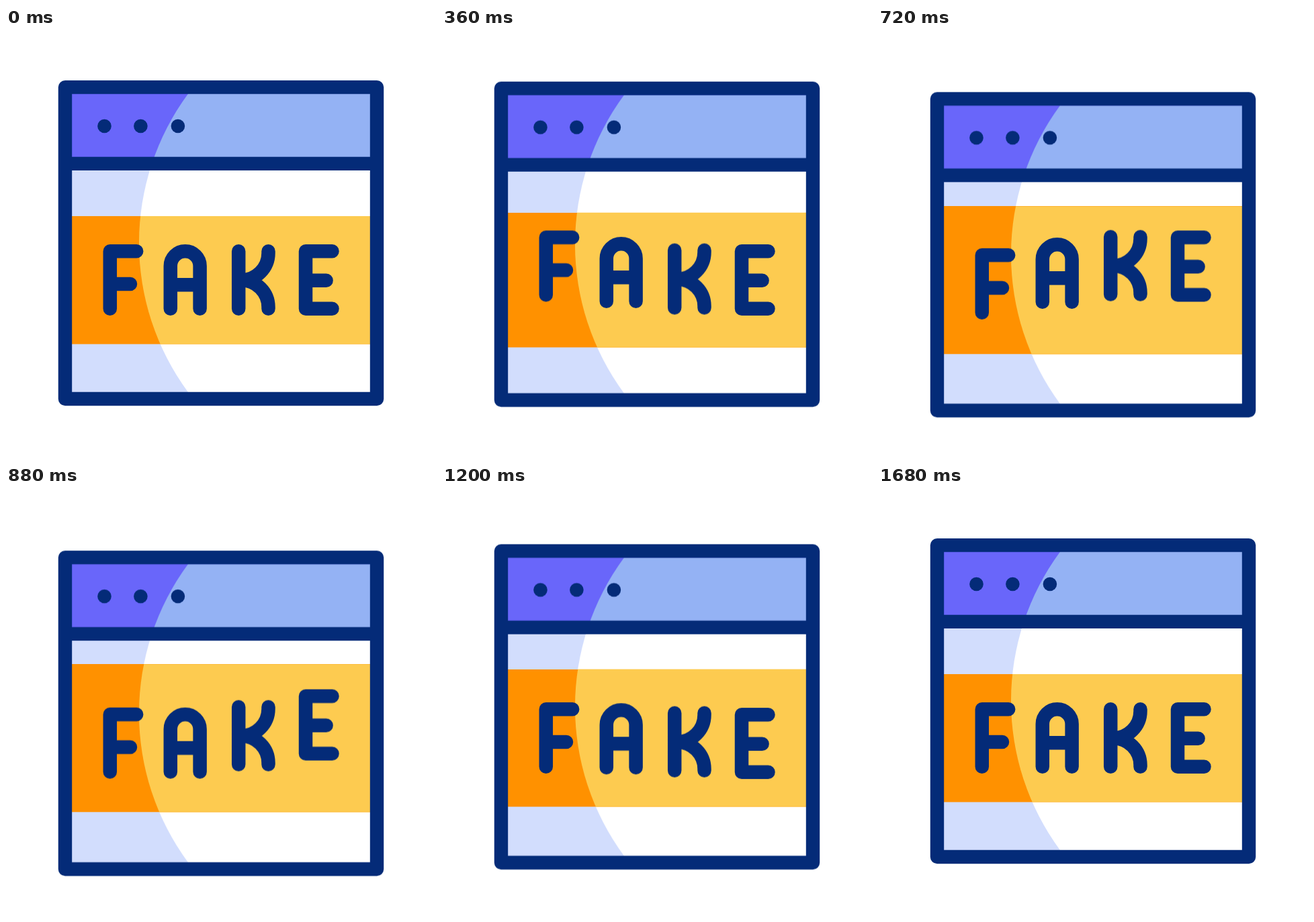
An HTML page for the animation above (1720 ms loop, 640 by 640 pixels).

```html
<!DOCTYPE html>
<html lang="en">
<head>
<meta charset="utf-8">
<title>Fake page</title>
<style>
  html, body { margin: 0; width: 100%; height: 100%; overflow: hidden; background: #fff; }
  svg { display: block; width: 100%; height: 100%; }

  .sink, .band, .letters path {
    animation: 1720ms cubic-bezier(.5, 0, .5, 1) infinite;
  }
  .sink { --dy: 18.3px; animation-name: sink; }
  .undo { --dy: -18.3px; }
  .band { animation-name: grow; transform-origin: 320px 375.25px; }
  .letters path { animation-name: hop; }
  .letters path:nth-child(2) { animation-delay: 120ms; }
  .letters path:nth-child(3) { animation-delay: 240ms; }
  .letters path:nth-child(4) { animation-delay: 360ms; }

  @keyframes sink {
    0%, 12.5% { transform: translateY(0); }
    48.55%, 49.1% { transform: translateY(var(--dy)); }
    89.3%, 100% { transform: translateY(0); }
  }
  @keyframes grow {
    0%, 4.42% { transform: scaleY(1); }
    44.77%, 47.85% { transform: scaleY(1.1564); }
    90.3%, 100% { transform: scaleY(1); }
  }
  @keyframes hop {
    0%, 2.326% { transform: translateY(0); }
    25.58% { transform: translateY(-22px); }
    46.51% { transform: translateY(8.2px); }
    69.77%, 100% { transform: translateY(0); }
  }

  .ink { fill: none; stroke: #042b78; stroke-linecap: round; stroke-linejoin: round; }
  .dots { fill: #042b78; }
</style>
</head>
<body>
<svg viewBox="0 0 640 640">
  <defs>
    <clipPath id="lit"><path d="M271 98A374 374 0 0 0 271 542H552V98Z"/></clipPath>
  </defs>

  <g class="sink">
    <path fill="#d2ddfd" d="M88 202H552V552H88Z"/>
    <path fill="#6966fa" d="M88 88H552V202H88Z"/>
    <g clip-path="url(#lit)">
      <path fill="#fff" d="M88 202H552V552H88Z"/>
      <path fill="#94b2f4" d="M88 88H552V202H88Z"/>
    </g>
  </g>

  <rect class="band" x="90" y="280" width="460" height="190.5" fill="#ff9100"/>
  <!-- The lit edge follows the window while the band stays centred. -->
  <g class="sink" clip-path="url(#lit)">
    <g class="sink undo">
      <rect class="band" x="90" y="280" width="460" height="190.5" fill="#fdcb50"/>
    </g>
  </g>

  <g class="sink">
    <path class="ink" stroke-width="20.4" d="M88 88.1H552V552H88ZM88 201.9H552"/>
    <g class="dots">
      <circle cx="146.5" cy="146" r="10.3"/>
      <circle cx="200.4" cy="146" r="10.3"/>
      <circle cx="255.9" cy="146" r="10.3"/>
    </g>
  </g>

  <g class="ink letters" stroke-width="20.5">
    <path d="M194.2 332.2H154.8V417.8M154.8 381H185"/>
    <path d="M244.8 417.8V354.2a21.9 21.9 0 0 1 43.8 0V417.8M244.8 382.3H288.6"/>
    <path d="M346.2 332.2V417.8M390.5 332.2V335a40.3 40.3 0 0 1-40.3 40.3a40.3 40.3 0 0 1 40.3 40.3V417.8"/>
    <path d="M485.5 332.2H446V417.8H485.5M446 375.8H476.6"/>
  </g>
</svg>
</body>
</html>
```
